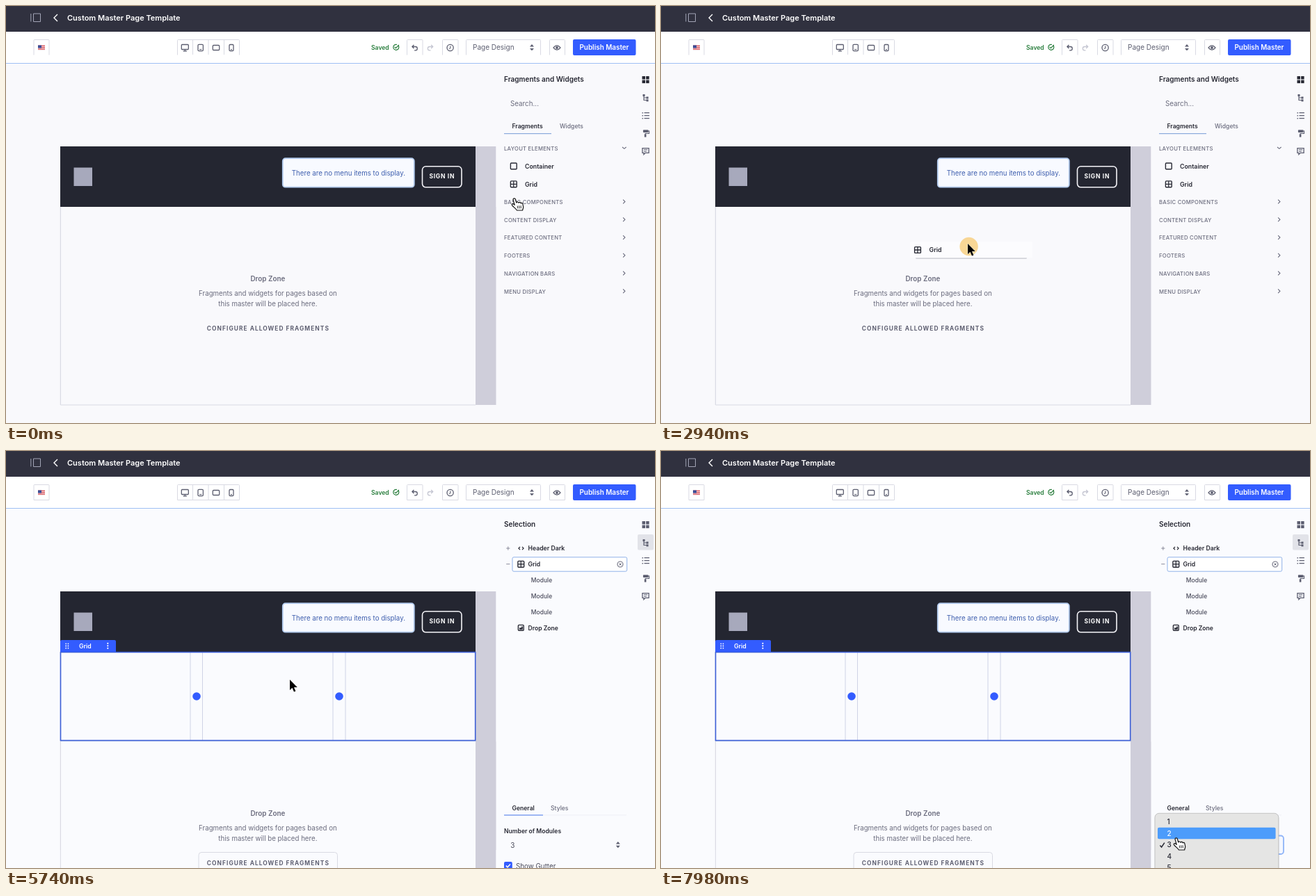
Recreate the animation shown at these times as an HTML page. Size 933 px wide and 600 px high, loop 8 s.

```html
<!DOCTYPE html>
<html lang="en">
<head>
<meta charset="utf-8">
<title>Master page editor</title>
<style>
  html, body { margin: 0; width: 100%; height: 100%; overflow: hidden; background: #f9f9fc; }
  svg { display: block; width: 933px; height: 600px; font-family: Inter, "Open Sans", sans-serif; }
  text { white-space: pre; }
</style>
</head>
<body>
<svg id="stage" viewBox="0 0 933 600"></svg>
<script>
const INK = '#272833', GREY = '#6b6c7e', BLUE = '#335cff', EDGE = '#d9dae3';

// Markup helpers
const attrs = o => Object.entries(o).map(([k, v]) => ` ${k}="${v}"`).join('');
const rect = (x, y, w, h, fill, o = {}) =>
  `<rect x="${x}" y="${y}" width="${w}" height="${h}" fill="${fill}"${attrs(o)}/>`;
const dot = (x, y, r, fill, o = {}) => `<circle cx="${x}" cy="${y}" r="${r}" fill="${fill}"${attrs(o)}/>`;
const line = (d, stroke, width = 1, o = {}) =>
  `<path d="${d}" fill="none" stroke="${stroke}" stroke-width="${width}"${attrs(o)}/>`;
const group = (id, ...parts) => `<g id="${id}">${parts.join('')}</g>`;
const at = (x, y, ...parts) => `<g transform="translate(${x} ${y})">${parts.join('')}</g>`;
// Text placed by the middle of its capitals
const label = (x, cy, str, size, weight = 400, fill = INK, o = {}) =>
  `<text x="${x}" y="${(cy + size * 0.364).toFixed(2)}" font-size="${size}" font-weight="${weight}" fill="${fill}"${attrs(o)}>${str}</text>`;
const mid = { 'text-anchor': 'middle' };

// Icons, each centred on its point
const gridIcon = (x, y) => at(x, y,
  rect(-4.4, -4.4, 8.8, 8.8, 'none', { rx: 1, stroke: INK, 'stroke-width': 1.4 }),
  line('M0-4V4M-4 0H4', INK, 1.3));
const sorter = (x, y) => at(x, y, '<path d="M-3-1.2L0-4.6 3-1.2ZM-3 1.2L0 4.6 3 1.2Z" fill="#5c5e70"/>');
const chevron = (x, y) => line(`M${x - 1.4} ${y - 2.8}l2.8 2.8l-2.8 2.8`, GREY, 1.1);
const device = (x, w, h) => rect(x - w / 2, 60 - h / 2, w, h, 'none', { rx: 1.3, stroke: '#5c5e70', 'stroke-width': 1.3 });
const arc = (x, y, flip, color) => at(x, y,
  `<g transform="scale(${flip} 1)">` +
  line('M-3.4-1.5H1A2.6 2.6 0 0 1 1 3.8H-.5M-1.2-4L-3.7-1.5L-1.2 1', color, 1.3) + '</g>');

function header() {
  return rect(0, 0, 933, 37, '#30313f') +
    line('M35.8 11V22.5M39.5 11H49.5V22.5H39.5Z', '#a2a4b6') +
    line('M74 12L69 17L74 22', '#fff', 1.4) +
    label(88, 17, 'Custom Master Page Template', 11, 600, '#fff');
}

function toolbar() {
  const open = (x, w) => line(`M${x} 70.5V49.5Q${x} 48.5 ${x + 1} 48.5H${x + w - 1}Q${x + w} 48.5 ${x + w} 49.5V70.5`, EDGE);
  const boxes = [[40, 22], [246.5, 89], [576.5, 22.5], [627.5, 22.5], [661.5, 107], [781.5, 22]];
  const stripes = [57.2, 59.6, 62].map(y => rect(46, y - 0.6, 10, 1.2, '#d8484f')).join('');
  return rect(0, 37, 933, 45, '#fff') + rect(0, 82, 933, 1, '#9fc0f4') +
    boxes.map(b => open(...b)).join('') +
    group('closed', ...boxes.map(([x, w]) => line(`M${x} 70.5H${x + w}`, EDGE))) +
    line('M268.5 49V70M291 49V70M313.5 49V70', EDGE) +
    rect(46, 56.5, 10, 7.2, '#f3dfe3') + stripes + rect(46, 56.5, 5, 4, '#3b4d96') +
    at(257.3, 59.5, rect(-5, -4, 10, 7, 'none', { rx: 1, stroke: '#5c5e70', 'stroke-width': 1.3 }),
      line('M0 3V5.3M-2.6 5.4H2.6', '#5c5e70', 1.2)) +
    device(279.7, 7.4, 9.2) + line('M278 62.6H281.4', '#5c5e70') +
    device(302, 9.4, 7) + device(324, 6, 9) + line('M323 62.6H325', '#5c5e70') +
    label(525, 59.5, 'Saved', 8.6, 600, '#287d3c') +
    line('M564.3 57.4A4 4 0 1 1 562 55.5M558.6 58.8L560.4 60.6L564.8 56', '#287d3c', 1.2) +
    arc(587.6, 60, 1, '#5c5e70') + arc(610, 60, -1, '#c5c6d2') +
    dot(638.6, 60, 4.6, 'none', { stroke: '#5c5e70', 'stroke-width': 1.3 }) +
    line('M638.8 57.5V60.3L637.3 62', '#5c5e70', 1.1) +
    label(671, 59.7, 'Page Design', 10, 400, '#5c5e70') + sorter(756, 59.7) +
    line('M787 60Q792 53.8 797 60Q792 66.2 787 60Z', '#5c5e70', 1.2) + dot(792, 60, 1.9, '#5c5e70') +
    rect(815, 48, 90.5, 23, BLUE, { rx: 2 }) +
    label(860, 59.8, 'Publish Master', 9.9, 600, '#fff', mid);
}

function rail() {
  const c = '#5c5e70';
  const four = color => [[-5, -5], [0.6, -5], [-5, 0.6], [0.6, 0.6]]
    .map(([x, y]) => rect(x, y, 4.5, 4.5, color)).join('');
  return group('railActive', rect(908, 120, 23, 22.5, '#e2e3e9', { rx: 2 })) +
    at(919.5, 106, `<g id="railGrid" fill="${INK}">${four('inherit')}</g>`) +
    at(919.5, 132, line('M-2.5-4V3.5H1.5M-2.5 0H1.5', c, 1.2),
      rect(-4, -5, 3, 3, c), rect(1, -1.5, 3, 3, c), rect(1, 2.4, 3, 3, c)) +
    at(919.5, 157.7, line('M-2-4H5.4M-2 0H5.4M-2 4H5.4', c, 1.3), line('M-5-4H-3.6M-5 0H-3.6M-5 4H-3.6', c, 1.4)) +
    at(919.5, 183, rect(-3.6, -4.8, 7.6, 3.8, c, { rx: 0.8 }),
      line('M4-3.2H5V.5H-.5V2', c, 1.1), rect(-1.7, 1.6, 2.6, 4, c)) +
    at(919.5, 209, line('M-4.6-4.4H4.6V2.4H-.4L-2.6 4.6V2.4H-4.6Z', c, 1.3), line('M-2.6-2.2H2.6M-2.6.2H1.4', c));
}

function page() {
  return rect(675, 202, 29.3, 372, '#cfceda') +
    line('M78.4 289V574', EDGE) +
    group('drop',
      rect(675, 289, 29.3, 285, '#cfceda'),
      line('M78.4 289V574H675', EDGE),
      label(376.4, 392, 'Drop Zone', 9.9, 600, GREY, mid),
      label(376.4, 413, 'Fragments and widgets for pages based on', 9.7, 400, GREY, mid),
      label(376.4, 428.7, 'this master will be placed here.', 9.7, 400, GREY, mid),
      group('outline', rect(277, 448.5, 199.5, 31, 'none', { rx: 4, stroke: EDGE })),
      label(376.9, 463.5, 'CONFIGURE ALLOWED FRAGMENTS', 8.4, 700, '#5f6072', { ...mid, 'letter-spacing': 1.05 })) +
    rect(78, 202, 597, 87, '#242631') +
    rect(97.5, 232.5, 26.5, 26.5, '#a7a9bc') +
    rect(397.8, 219.2, 189, 41.5, '#f8faff', { rx: 4, stroke: '#b3cbee', 'stroke-width': 1.8 }) +
    label(492.4, 240, 'There are no menu items to display.', 9.7, 400, '#3f5fae', mid) +
    rect(598.5, 230.8, 56.5, 30, 'none', { rx: 5, stroke: '#f4f4f8', 'stroke-width': 1.6 }) +
    label(626.8, 244.7, 'SIGN IN', 8.5, 700, '#fff', { ...mid, 'letter-spacing': 0.7 }) +
    group('modules',
      line('M265 289V416M282.5 289V416M470 289V416M488 289V416', '#cfd3e6'),
      line('M78 417H675', '#a9c0e8', 1.2), line('M78.4 289V417', '#bccbec')) +
    group('chosen',
      rect(78.5, 289.5, 596.2, 127, 'none', { stroke: '#3c5fd6', 'stroke-width': 1.6 }),
      `<path d="M78 289V274Q78 272 80 272H156Q158 272 158 274V289Z" fill="${BLUE}"/>`,
      [-3.2, 0, 3.2].map(d => dot(86.2, 280.5 + d, 0.9, '#fff') + dot(89.4, 280.5 + d, 0.9, '#fff') + dot(146.3, 280.3 + d * 1.1, 1.1, '#fff')).join(''),
      label(113.8, 280.5, 'Grid', 8.7, 600, '#fff', mid),
      dot(274, 353, 5.8, BLUE), dot(479, 353, 5.8, BLUE));
}

function fragments() {
  const sections = ['BASIC COMPONENTS', 'CONTENT DISPLAY', 'FEATURED CONTENT', 'FOOTERS', 'NAVIGATION BARS', 'MENU DISPLAY'];
  const caps = (y, s) => label(716, y, s, 7.7, 500, GREY, { 'letter-spacing': 0.24 });
  return group('fragments',
    label(716, 105.3, 'Fragments and Widgets', 10, 600),
    label(725, 140.5, 'Search...', 9.8, 400, GREY),
    label(727.5, 173.2, 'Fragments', 8.6, 600), label(796, 173.2, 'Widgets', 8.6, 500, GREY),
    rect(716, 183, 68, 1.2, '#8aa9dc'),
    caps(204.7, 'LAYOUT ELEMENTS'), line('M886 203L888.8 205.4L891.6 203', GREY, 1.1),
    rect(725.4, 226, 8.8, 8.8, 'none', { rx: 1, stroke: INK, 'stroke-width': 1.4 }),
    label(746, 230.4, 'Container', 8.8, 600),
    gridIcon(729.8, 256.3), label(746, 256.3, 'Grid', 8.8, 600),
    ...sections.map((s, i) => caps(282 + i * 25.75, s) + chevron(888.5, 281.5 + i * 25.75)));
}

function selection() {
  return group('selection',
    label(716, 105.3, 'Selection', 10, 600),
    line('M719.2 140H724.4M721.8 137.4V142.6M719.2 162.7H724.4', '#8a8b9c'),
    line('M739 137.8L736.9 140L739 142.2M742 137.8L744.1 140L742 142.2', INK, 1.2),
    label(750.5, 140.2, 'Header Dark', 8.7, 600),
    rect(728, 152.8, 164.7, 20.4, '#fff', { rx: 2, stroke: '#8fb1e8' }),
    gridIcon(740.3, 162.8), label(750.5, 163, 'Grid', 8.7, 600),
    dot(883, 163, 4, 'none', { stroke: GREY, 'stroke-width': 1.1 }),
    line('M881.4 161.4L884.6 164.6M884.6 161.4L881.4 164.6', GREY),
    ...[186, 209, 231.7].map(y => label(754.8, y, 'Module', 8.5, 500, '#4b4c5c')),
    rect(736.4, 250.4, 7.8, 7.8, 'none', { rx: 1, stroke: INK, 'stroke-width': 1.4 }),
    rect(738, 254.4, 3, 2.4, INK), rect(741, 252.4, 1.8, 4.4, INK),
    label(750.5, 254.5, 'Drop Zone', 8.6, 600),
    label(727.5, 513.7, 'General', 8.6, 600), label(783, 513.7, 'Styles', 8.6, 500, GREY),
    line('M716 523.9H892', '#eef0f6'), rect(716, 523.2, 56, 1.4, '#7b9df0'),
    label(716, 546.7, 'Number of Modules', 8.6, 600),
    label(725.3, 567, '3', 10, 400, '#4b4c5c'), sorter(879.8, 566.6),
    rect(716, 591, 11.8, 12, BLUE, { rx: 2 }), line('M718.8 596.6L721 598.8L725 594.4', '#fff', 1.5),
    label(733, 597.2, 'Show Gutter', 9.8, 400, '#4b4c5c'));
}

function menu() {
  return group('menu',
    rect(714, 553.5, 181, 26.5, '#f4f7ff', { rx: 4, stroke: '#8fb4f8', 'stroke-width': 1.8 }),
    rect(709.6, 522.6, 179, 90, '#000', { rx: 6, opacity: 0.1 }),
    rect(710, 521.3, 177.8, 90, '#e5e5e4', { rx: 6, stroke: '#c3c3c4' }),
    rect(714, 541.8, 169.6, 16.4, '#4c9cfb', { id: 'mark', rx: 2 }),
    ...[1, 2, 3, 4, 5].map(n => label(727.4, 517.4 + n * 16.4, n, 10, 500, INK, { id: 'opt' + n })),
    line('M717.4 567.4L719.6 570L723.8 563.6', INK, 1.5, { id: 'tick' }));
}

function pointer() {
  const hand = 'M-1.9 1.8C-2.2-.6 1-.9 1.5 1.4L2.7 6C3.2 4.6 5.3 4.6 6 6.2C6.8 4.9 8.6 5.1 9.1 6.8C10 5.8 11.6 6.4 11.9 8L12.6 11.5C13 14 11.8 15 11.6 17H3.4C2 14.5-1.6 12.2-3.6 9.6C-4.4 8-2.4 7-1 8.2L.2 9.4Z';
  return group('card',
      rect(-3, 10.2, 160, 2.6, '#9a9ba8', { rx: 1.3, opacity: 0.55 }),
      rect(-11, -12, 176, 23.4, '#fcfcfe', { rx: 2 }),
      gridIcon(0, 0), label(16.6, 0.2, 'Grid', 8.8, 600)) +
    group('press', dot(0, 0, 13.2, '#f8d083', { opacity: 0.85 })) +
    group('hand', `<path d="${hand}" fill="#fff" stroke="#111" stroke-width="1.2" stroke-linejoin="round"/>`,
      line('M4.2 10.5L4.9 14.4M6.6 10.3L7.2 14.4M9 10.2L9.4 14.2', '#111', 0.9)) +
    group('arrow', '<path d="M0 0V15L3.5 11.8L6 17.5L8.4 16.4L6 11H10.8Z" fill="#000" stroke="#fff" stroke-width=".8" paint-order="stroke"/>');
}

const stage = document.getElementById('stage');
stage.innerHTML = rect(0, 0, 933, 600, '#f9f9fc', { id: 'back' }) + page() + header() + toolbar() +
  rail() + fragments() + selection() + menu() + pointer();
const el = id => document.getElementById(id);
const show = (id, on) => el(id).setAttribute('display', on ? 'inline' : 'none');
const move = (id, x, y) => el(id).setAttribute('transform', `translate(${x.toFixed(2)} ${y.toFixed(2)})`);

// Rows: time, x, y
const cursorPath = [[0, 731, 277], [840, 803, 257], [1260, 803, 257], [1680, 712, 286], [2590, 441, 342],
  [3080, 441, 342], [3640, 407, 308], [4480, 407, 308], [4900, 408, 329], [5810, 408, 329],
  [6580, 737, 566], [7420, 737, 566], [7840, 741, 557], [8000, 741, 557]];
const cardPath = [[1260, 729.8, 256.3], [1680, 638, 281], [2590, 369, 351], [3080, 369, 351], [3640, 335, 317], [8000, 335, 317]];
const pressPath = [[1260, 804, 256], [1680, 713.3, 283], [2590, 442.6, 346], [3080, 442.6, 346], [3640, 408.6, 312],
  [4480, 408.6, 312], [4900, 410, 332], [8000, 410, 332]];
const DROP = 3920, SELECT = 5180, OPEN = 7280;

function pos(path, t) {
  let i = path.findIndex(row => row[0] > t);
  if (i < 1) i = 1;
  const [a, b] = [path[i - 1], path[i]];
  const u = Math.min(1, Math.max(0, (t - a[0]) / (b[0] - a[0])));
  const e = u * u * (3 - 2 * u);
  return [a[1] + (b[1] - a[1]) * e, a[2] + (b[2] - a[2]) * e];
}

function render(t) {
  const dragging = t >= 1260 && t < DROP, dropped = t >= DROP, chosen = t >= SELECT, open = t >= OPEN;
  const [x, y] = pos(cursorPath, t);
  el('back').setAttribute('fill', dropped ? '#fafbfe' : '#f9f9fc');
  move('drop', 0, dropped ? 129 : 0);
  show('modules', dropped);
  for (const id of ['chosen', 'selection', 'railActive', 'closed', 'outline']) show(id, chosen);
  show('fragments', !chosen);
  el('railGrid').setAttribute('fill', chosen ? '#5c5e70' : INK);

  show('menu', open);
  const pick = Math.floor((y - 525.4) / 16.4) + 1;
  el('mark').setAttribute('y', 509 + pick * 16.4);
  for (let n = 1; n <= 5; n++) el('opt' + n).setAttribute('fill', n === pick ? '#fff' : INK);
  el('tick').setAttribute('stroke', pick === 3 ? '#fff' : INK);

  const overLink = !dragging && x > 716;
  show('hand', overLink);
  show('arrow', !overLink);
  move('hand', x, y);
  move('arrow', x, y);
  show('card', dragging);
  move('card', ...pos(cardPath, t));
  show('press', dragging || (t >= SELECT - 140 && t < SELECT + 70));
  move('press', ...pos(pressPath, t));
}

const start = performance.now();
function tick() {
  const t = (performance.now() - start) % 8000;
  render(Math.floor(t / 70) * 70);
  requestAnimationFrame(tick);
}
tick();
</script>
</body>
</html>
```
